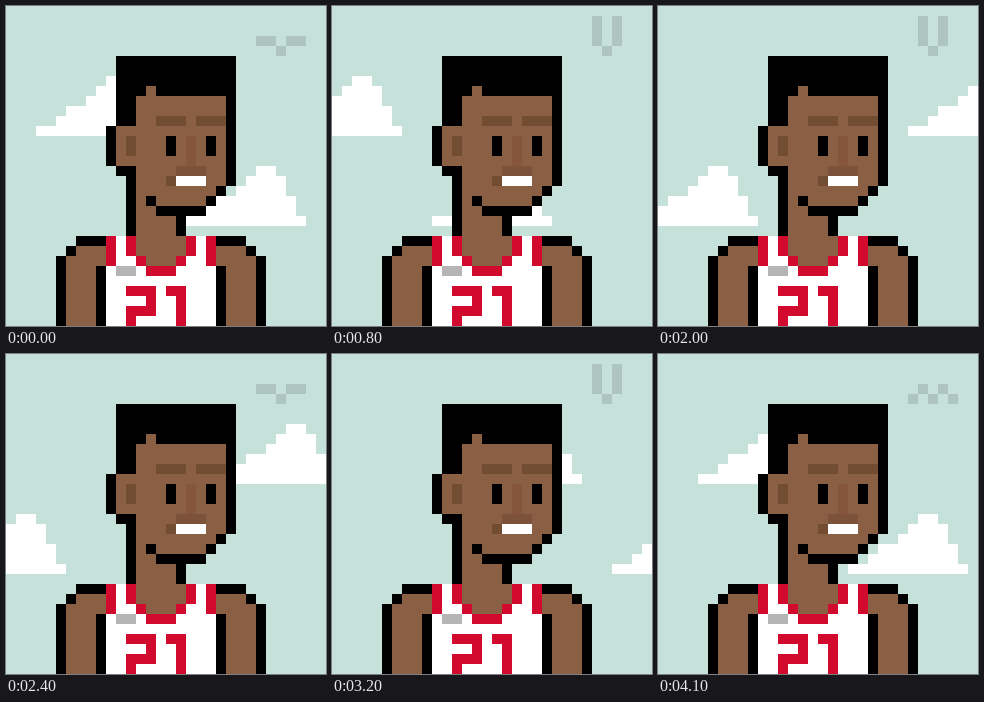
Write an HTML page that moves like this. It is 320x320 px and loops after 4.2 s.

```html
<!DOCTYPE html>
<html lang="en">
<head>
<meta charset="utf-8">
<title>Pixel player</title>
<style>
  html, body { margin: 0; width: 100%; height: 100%; overflow: hidden; background: #c5e1da; }
  svg { display: block; width: 100vw; height: 100vh; }
</style>
</head>
<body>
<svg viewBox="0 0 32 32" shape-rendering="crispEdges">
  <defs>
    <path id="puff" fill="#fff" d="M0 6V5H2V4H3V3H5V2H6V1H7V0H9V1H10V3H11V5H12V6Z"/>
  </defs>
  <rect width="32" height="32" fill="#c5e1da"/>
  <use id="high" href="#puff"/>
  <use id="low" href="#puff"/>
  <path id="bird" fill="#adc5be"/>

  <!-- head -->
  <path d="M11 5H23V18H22V19H21V20H20V21H18V23H12V17H11V16H10V12H11Z"/>
  <path fill="#8b5f43" d="M13 9H14V8H15V9H22V18H21V19H20V20H17V23H13V16H11V12H13Z"/>
  <path d="M14 19h1v1h5v1h-5v-1h-1zM16 13h1v2h-1zM20 13h1v2h-1z"/>
  <path fill="#734d32" d="M12 13h1v2h-1zM15 11h3v1h-3zM19 11h3v1h-3zM16 17h1v1h-1z"/>
  <path fill="#85563b" d="M18 13h1v3h-1z"/>
  <path fill="#7c523a" d="M17 16h3v1h-3z"/>
  <path fill="#fff" d="M17 17h3v1h-3z"/>

  <!-- arms -->
  <path d="M7 23H24V24H25V25H26V32H5V25H6V24H7Z"/>
  <path fill="#8b5f43" d="M7 24H10V26H9V32H6V25H7ZM21 24H24V25H25V32H22V26H21Z"/>

  <!-- jersey -->
  <path fill="#fff" d="M10 23H21V32H10Z"/>
  <path fill="#8b5f43" d="M13 23H18V25H17V26H14V25H13Z"/>
  <path fill="#d20a2e" d="M10 23h1v3h-1zM20 23h1v3h-1zM12 23h1v2h1v1h3v-1h1v-2h1v2h-1v1h-1v1h-3v-1h-1v-1h-1z"/>
  <path fill="#b5b5b5" d="M11 26h2v1h-2z"/>
  <path fill="#d20a2e" d="M12 28h3v3h-2v1h-1v-2h2v-1h-2zM16 28h2v4h-1v-3h-1z"/>
</svg>
<script>
const STEP = 100, STEPS = 42, CLOUD_W = 12;
const el = id => document.getElementById(id);
const high = el('high'), low = el('low'), bird = el('bird');

// Left wing as [x, y, w, h] blocks, mirrored around the body
const wings = [
  [[25, 3, 2, 1]],
  [[25, 2, 1, 1], [26, 3, 1, 1]],
  [[26, 1, 1, 3]],
  [[24, 3, 3, 1]],
  [[25, 4, 1, 2], [26, 3, 1, 1]],
  [[25, 4, 1, 1], [26, 3, 1, 1]]
];
const block = (x, y, w, h) => `M${x} ${y}h${w}v${h}h${-w}z`;
const birdPath = wing => block(27, 4, 1, 1) +
  wing.map(([x, y, w, h]) => block(x, y, w, h) + block(55 - x - w, y, w, h)).join('');
const poses = wings.map(birdPath);

function drift(cloud, start, y, n) {
  const x = (start - n + CLOUD_W + STEPS) % STEPS - CLOUD_W;
  cloud.setAttribute('transform', `translate(${x} ${y})`);
}

function draw(ms) {
  const n = Math.floor(ms / STEP) % STEPS;
  drift(high, 3, 7, n);
  drift(low, 18, 16, n);
  bird.setAttribute('d', poses[n % poses.length]);
}

const begin = performance.now();
function tick() {
  draw(performance.now() - begin);
  requestAnimationFrame(tick);
}
tick();
</script>
</body>
</html>
```
